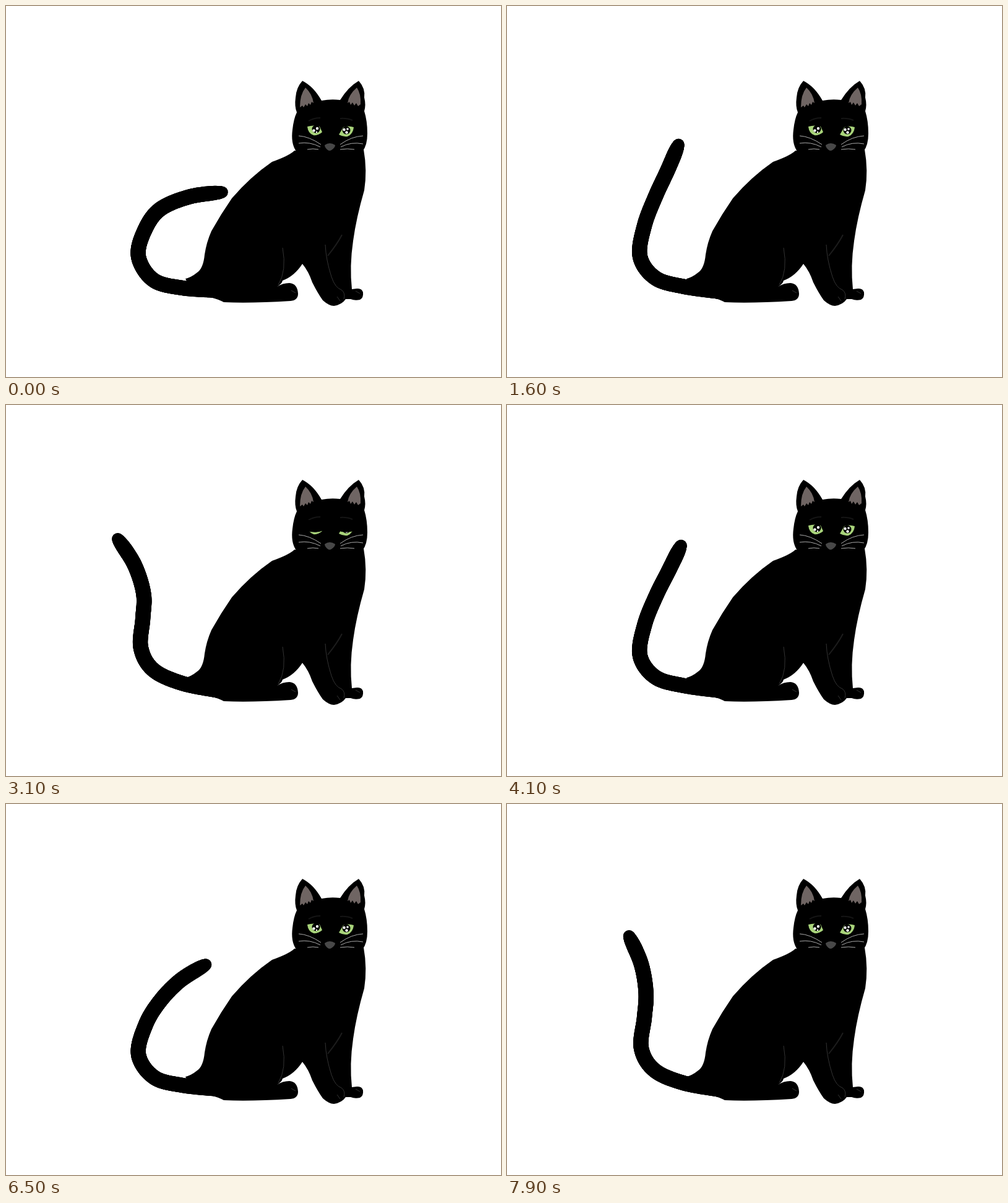
An HTML page with a canvas that plays this animation: 800x600 px, repeating every 8000 ms.

```html
<!DOCTYPE html>
<html lang="en">
<head>
<meta charset="utf-8">
<title>Black cat</title>
<style>
html, body { margin: 0; width: 100%; height: 100%; overflow: hidden; background: #fff; }
canvas { display: block; }
</style>
</head>
<body>
<canvas id="stage" width="800" height="600"></canvas>
<script>
const ctx = document.getElementById('stage').getContext('2d');
const LOOP = 8000, STEP = 100;

// Tail centre lines from base to tip, keyed by how far the tip has swung left.
const poses = [
  [0,   [345,460, 285,456, 238,443, 214,405, 224,363, 249,329, 297,309, 350,302]],
  [46,  [345,461, 285,455, 239,442, 214,405, 226,357, 250,319, 284,286, 326,262]],
  [108, [345,462, 287,454, 240,440, 215,405, 222,355, 240,307, 259,265, 276,223]],
  [189, [345,462, 285,451, 238,430, 217,394, 222,345, 224,305, 215,258, 194,213]],
  [205, [345,462, 285,450, 238,428, 218,392, 221,345, 222,305, 206,258, 178,217]]
];
const blinks = [950, 2850, 4550, 5950];

const body = new Path2D(`M466 234 Q458 242 430 252 Q395 276 365 311 Q347 337 332 364
  Q324 382 321 402 Q319 424 309 431 Q299 439 290 441 L302 466 Q335 470 352 479
  Q395 481 460 477 Q472 476 472 465 Q471 449 458 448 Q447 448 438 454 Q446 449 447 444
  Q466 437 479 417 Q489 429 495 447 Q504 465 512 476 Q522 485 530 485 Q543 483 549 474
  L557 474 Q564 477 572 475 Q578 472 577 463 Q575 456 567 457 L559 458
  Q555 420 561 380 Q566 343 579 298 Q584 266 578 232 Z`);
const head = new Path2D(`M469 235 Q460 222 463 200 Q465 182 470 172 Q466 162 468 148
  Q469 132 479 121 Q497 130 510 153 Q525 150 540 152 Q553 131 570 121
  Q581 133 579 148 Q582 160 579 170 Q584 186 584 206 Q584 226 576 235 Z`);
const ears = new Path2D(`M484 132 Q475 143 475 164 L479 161 L481 164 L484 159 L487 162
  L489 157 L492 160 L494 155 L497 157 Q495 142 484 132 Z
  M567 132 Q554 143 552 157 L555 155 L557 160 L560 156 L563 161 L566 157 L569 162
  L573 159 Q574 142 567 132 Z`);
const nose = new Path2D('M515 225 Q523 219 532 225 Q532 229 526 233 Q523 235 520 233 Q515 229 515 225 Z');
const whiskers = new Path2D(`M473 210 Q490 211 509 224 M473 222 Q491 219 508 228 M487 232 Q496 230 505 232
  M577 210 Q558 211 540 224 M577 223 Q558 219 541 228 M563 232 Q552 230 540 232`);
const brows = new Path2D('M489 186 Q497 181 508 181 M540 182 Q551 181 560 185');
const creases = new Path2D(`M447 391 Q454 428 440 451 M516 386 Q517 410 526 438
  Q532 456 542 459 Q549 464 546 474 M535 470 L540 477 M565 461 L572 465 M461 460 L468 464`);
const shoulder = new Path2D('M543 370 Q536 384 520 404');
const eyes = [
  { iris: new Path2D('M487 195 Q497 192 507 195 L511 204 Q504 210 497 209 Q488 206 487 195 Z'),
    pupil: [501, 199], shine: [[497.5, 201.5, 2.2], [503, 198, 2.2], [502, 204, 1.2]],
    lid: [483, 515] },
  { iris: new Path2D('M562 196 Q553 193 545 196 L538 208 Q545 212 552 211 Q561 207 562 196 Z'),
    pupil: [550, 201], shine: [[546.5, 200, 2.2], [552, 199, 1.8], [550.5, 204.5, 2.2]],
    lid: [534, 566] }
];

const fill = (path, color) => { ctx.fillStyle = color; ctx.fill(path); };
const line = (path, color, width) => {
  ctx.strokeStyle = color;
  ctx.lineWidth = width;
  ctx.stroke(path);
};
const dot = (x, y, r, color) => {
  ctx.fillStyle = color;
  ctx.beginPath();
  ctx.arc(x, y, r, 0, 7);
  ctx.fill();
};

// The swing picks up speed towards the left and turns there sharply.
function swing(t) {
  const phase = (t - 150 + 5530) % 5530;
  const amount = phase < 2660 ? (phase / 2660) ** 1.28 : ((5530 - phase) / 2870) ** 1.38;
  return 238 * amount - 3;
}

function tailPoints(s) {
  let i = 0;
  while (i < poses.length - 2 && s > poses[i + 1][0]) i++;
  const [s0, a] = poses[i], [s1, b] = poses[i + 1];
  const k = (s - s0) / (s1 - s0);
  return a.map((v, j) => v + (b[j] - v) * k);
}

const spline = (a, b, c, d, u) =>
  b + u / 2 * (c - a + u * (2 * a - 5 * b + 4 * c - d + u * (3 * (b - c) + d - a)));

function drawTail(s) {
  const pts = tailPoints(s), last = pts.length / 2 - 1;
  const at = (i, axis) => pts[2 * Math.max(0, Math.min(last, i)) + axis];
  for (let n = 0; n <= 280; n++) {
    const p = n / 280 * last, i = Math.min(last - 1, Math.floor(p));
    const [x, y] = [0, 1].map(axis =>
      spline(at(i - 1, axis), at(i, axis), at(i + 1, axis), at(i + 2, axis), p - i));
    const taper = Math.max(0, p - last + 0.6) / 0.6;
    dot(x, y, 12.2 - 2.8 * taper * taper, '#000');
  }
}

function drawEye({ iris, pupil, shine, lid: [x0, x1] }, closed) {
  fill(iris, '#a9d47b');
  dot(...pupil, 6.5, '#000');
  shine.forEach(s => dot(...s, '#fff'));
  if (!closed) return;
  const y = 192 + 19 * closed;
  fill(new Path2D(`M${x0} 186 H${x1} V${y} Q${(x0 + x1) / 2} ${y + 7} ${x0} ${y} Z`), '#000');
}

function draw(t) {
  ctx.clearRect(0, 0, 800, 600);
  drawTail(swing(t));
  fill(body, '#000');
  fill(head, '#000');
  fill(ears, '#6f6563');
  line(brows, '#151515', 2);
  line(creases, '#333', 1);
  line(shoulder, '#1c1c1c', 2);
  const near = Math.min(...blinks.map(b => Math.abs(t - b)));
  const closed = Math.max(0, Math.min(1, 1.9 * (1 - near / 350)));
  eyes.forEach(eye => drawEye(eye, closed));
  line(whiskers, '#aaa', 1);
  fill(nose, '#484848');
}

const start = performance.now();
function frame() {
  const t = (performance.now() - start) % LOOP;
  draw(Math.floor(t / STEP) * STEP);
  requestAnimationFrame(frame);
}
frame();
</script>
</body>
</html>
```
